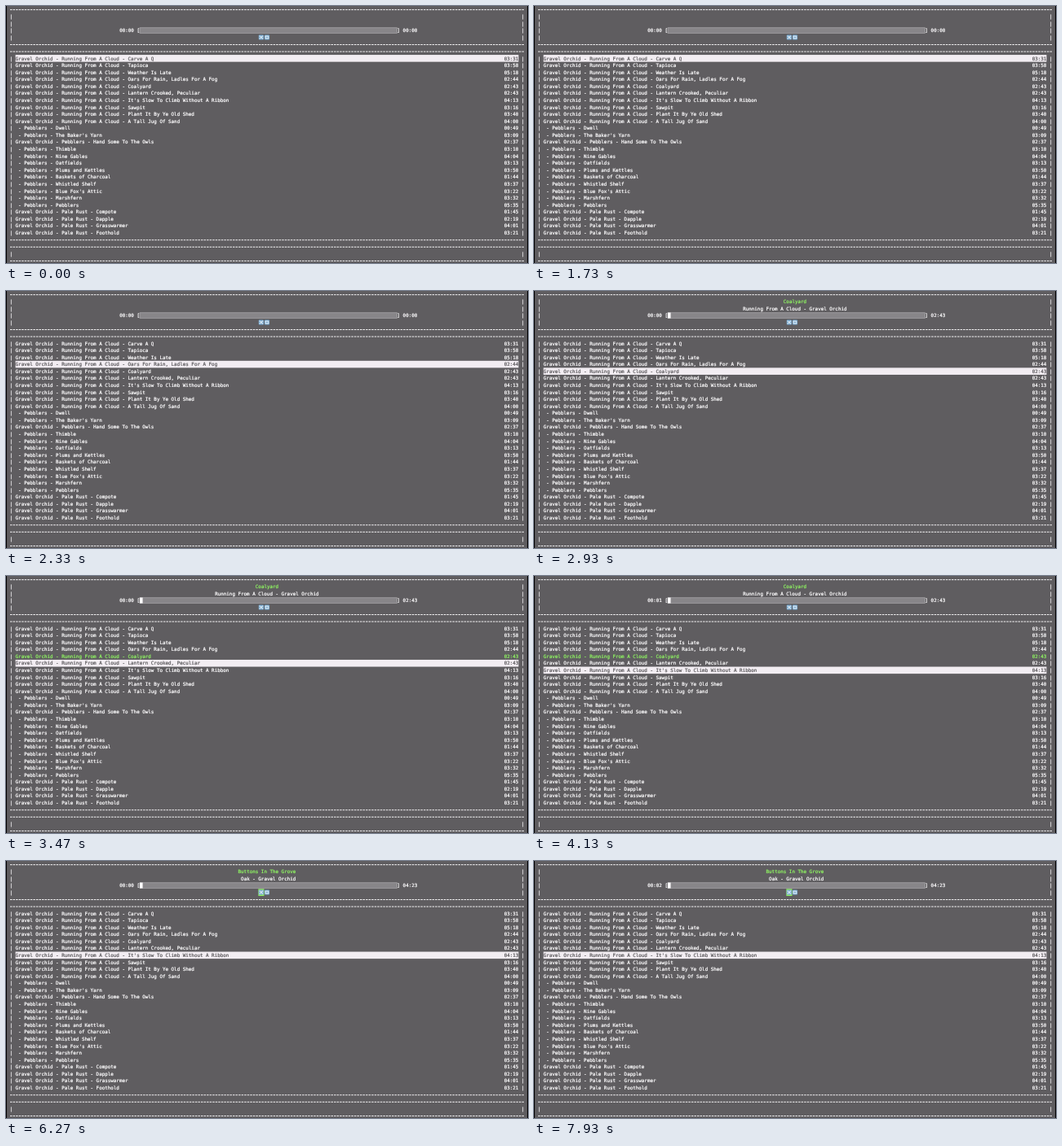
An HTML page for the animation above (8 s loop, 640x316 px).

```html
<!DOCTYPE html>
<html lang="en">
<head>
<meta charset="utf-8">
<title>Terminal music player</title>
<style>
  html, body { margin: 0; width: 100%; height: 100%; overflow: hidden; background: #5f5d60; }
  svg { display: block; width: 640px; height: 316px; }
  text {
    font-family: "DejaVu Sans Mono", "Liberation Mono", monospace;
    font-size: 5.888px;
    white-space: pre;
    text-rendering: geometricPrecision;
    fill: currentColor;
    stroke: currentColor;
    stroke-width: 0.22px;
  }
</style>
</head>
<body>
<svg id="stage" viewBox="0 0 640 316" xmlns="http://www.w3.org/2000/svg"></svg>
<script>
const LOOP = 8000;
const COLS = 178, CELL = 3.545, LEFT = 4.5;
const LINE = 8.58, TOP = 4.3;
const BAR_START = 45, BAR_CELLS = 89, LIST_ROW = 7;
const BG = '#5f5d60', FG = '#fdfcfd', GREEN = '#8ff562', SELECTED = '#f2edf2';

const BAND = 'Gravel Orchid';
const ALBUMS = { first: 'Running From A Cloud', second: 'Pebblers', third: 'Pale Rust' };

const tracks = [
  [BAND, 'first', 'Carve A Q', '03:31'],
  [BAND, 'first', 'Tapioca', '03:58'],
  [BAND, 'first', 'Weather Is Late', '05:18'],
  [BAND, 'first', 'Oars For Rain, Ladles For A Fog', '02:44'],
  [BAND, 'first', 'Coalyard', '02:43'],
  [BAND, 'first', 'Lantern Crooked, Peculiar', '02:43'],
  [BAND, 'first', "It's Slow To Climb Without A Ribbon", '04:13'],
  [BAND, 'first', 'Sawpit', '03:16'],
  [BAND, 'first', 'Plant It By Ye Old Shed', '03:40'],
  [BAND, 'first', 'A Tall Jug Of Sand', '04:00'],
  ['', 'second', 'Dwell', '00:49'],
  ['', 'second', "The Baker's Yarn", '03:09'],
  [BAND, 'second', 'Hand Some To The Owls', '02:37'],
  ['', 'second', 'Thimble', '03:10'],
  ['', 'second', 'Nine Gables', '04:04'],
  ['', 'second', 'Oatfields', '03:13'],
  ['', 'second', 'Plums and Kettles', '03:50'],
  ['', 'second', 'Baskets of Charcoal', '01:44'],
  ['', 'second', 'Whistled Shelf', '03:37'],
  ['', 'second', "Blue Fox's Attic", '03:22'],
  ['', 'second', 'Marshfern', '03:32'],
  ['', 'second', 'Pebblers', '05:35'],
  [BAND, 'third', 'Compote', '01:45'],
  [BAND, 'third', 'Dapple', '02:19'],
  [BAND, 'third', 'Grasswarmer', '04:01'],
  [BAND, 'third', 'Foothold', '03:21'],
];

// Moments at which the list selection moves down one row.
const cursorMoves = [2070, 2200, 2330, 2470, 3330, 3870];

// from: metadata appears; clock: playback time starts counting.
const songs = [
  { from: 0, clock: LOOP, row: -1, title: '', album: '', length: '00:00' },
  { from: 2870, clock: 3070, row: 4, title: 'Coalyard',
    album: `${ALBUMS.first} - ${BAND}`, length: '02:43' },
  { from: 5070, clock: 5600, row: -1, title: 'Buttons In The Grove',
    album: `Oak - ${BAND}`, length: '04:23' },
];
const SHUFFLE_ON = 4270;

const svg = document.getElementById('stage');
const colX = col => LEFT + col * CELL;
const rowY = row => TOP + row * LINE;

function add(tag, attrs, parent = svg) {
  const el = document.createElementNS('http://www.w3.org/2000/svg', tag);
  for (const key in attrs) el.setAttribute(key, attrs[key]);
  return parent.appendChild(el);
}

function cells(col, row, count, fill, height = LINE) {
  return add('rect', {
    x: colX(col), y: rowY(row) - height / 2, width: count * CELL, height, fill,
  });
}

function print(col, row, str, color = FG) {
  const el = add('text', { x: colX(col), y: rowY(row) + 2.15, color });
  el.textContent = str;
  return el;
}

function printCentred(el, str) {
  el.textContent = str;
  el.setAttribute('x', colX(Math.ceil((COLS - str.length) / 2)));
}

// A full-width row of hyphens
function rule(row) {
  const dash = 2.5;
  add('path', {
    d: `M${colX(0) + (CELL - dash) / 2} ${rowY(row) + 0.3}H${colX(COLS)}`,
    stroke: FG, 'stroke-width': 0.95, 'stroke-dasharray': `${dash} ${CELL - dash}`,
  });
}

function icon(col, path) {
  const g = add('g', { transform: `translate(${colX(col)} ${rowY(4) - 3.5})` });
  add('rect', { x: 0.4, y: 0.4, width: 6.2, height: 6, rx: 1, fill: '#78a9cf' }, g);
  add('path', { d: path, fill: 'none', stroke: '#fff', 'stroke-width': 0.9 }, g);
}

// Window edges and frames
add('rect', { width: 640, height: 316, fill: BG });
add('rect', { width: 1, height: 316, fill: '#000' });
add('rect', { x: 639, width: 1, height: 316, fill: '#000' });

const rules = [0, 5, 6, 33, 34, 36];
for (let row = 0; row <= 36; row++) {
  if (rules.includes(row)) {
    rule(row);
  } else {
    print(0, row, '|');
    print(COLS - 1, row, '|');
  }
}

// Player header
const title = print(0, 1, '', GREEN);
const album = print(0, 2, '');
const elapsed = print(38, 3, '');
const track = cells(BAR_START, 3, BAR_CELLS, '#888689', 6.6);
track.setAttribute('stroke', '#aaa8ab');
track.setAttribute('stroke-width', 0.7);
const progress = cells(BAR_START, 3, 1, FG, 7);
print(BAR_START - 1, 3, '[');
print(BAR_START + BAR_CELLS, 3, ']');
const total = print(136, 3, '');

const shuffle = cells(86, 4, 2, GREEN);
icon(86, 'M1.2 2H2.4L4.6 4.8H5.8M1.2 4.8H2.4L4.6 2H5.8');
icon(88, 'M1.6 3.6V2H5.2V3.2M5.4 3.4V4.8H1.8V3.8');

// Track list
const selection = cells(2, LIST_ROW, COLS - 4, SELECTED);
const rows = tracks.map(([band, key, name, length], i) => [
  print(2, LIST_ROW + i, `${band} - ${ALBUMS[key]} - ${name}`),
  print(171, LIST_ROW + i, length),
]);

const show = (el, on) => el.setAttribute('visibility', on ? 'visible' : 'hidden');

function render(t) {
  const song = songs.filter(s => t >= s.from).pop();
  const seconds = Math.max(0, Math.floor((t - song.clock) / 1000));
  const selected = cursorMoves.filter(at => t >= at).length;

  printCentred(title, song.title);
  printCentred(album, song.album);
  elapsed.textContent = '00:' + String(seconds).padStart(2, '0');
  total.textContent = song.length;
  show(progress, song.title);
  show(shuffle, t >= SHUFFLE_ON);

  selection.setAttribute('y', rowY(LIST_ROW + selected) - LINE / 2);
  rows.forEach((parts, i) => {
    const color = i === selected ? BG : i === song.row ? GREEN : FG;
    parts.forEach(el => el.setAttribute('color', color));
  });
}

const start = performance.now();
function tick() {
  render((performance.now() - start) % LOOP);
  requestAnimationFrame(tick);
}
render(0);
requestAnimationFrame(tick);
</script>
</body>
</html>
```
